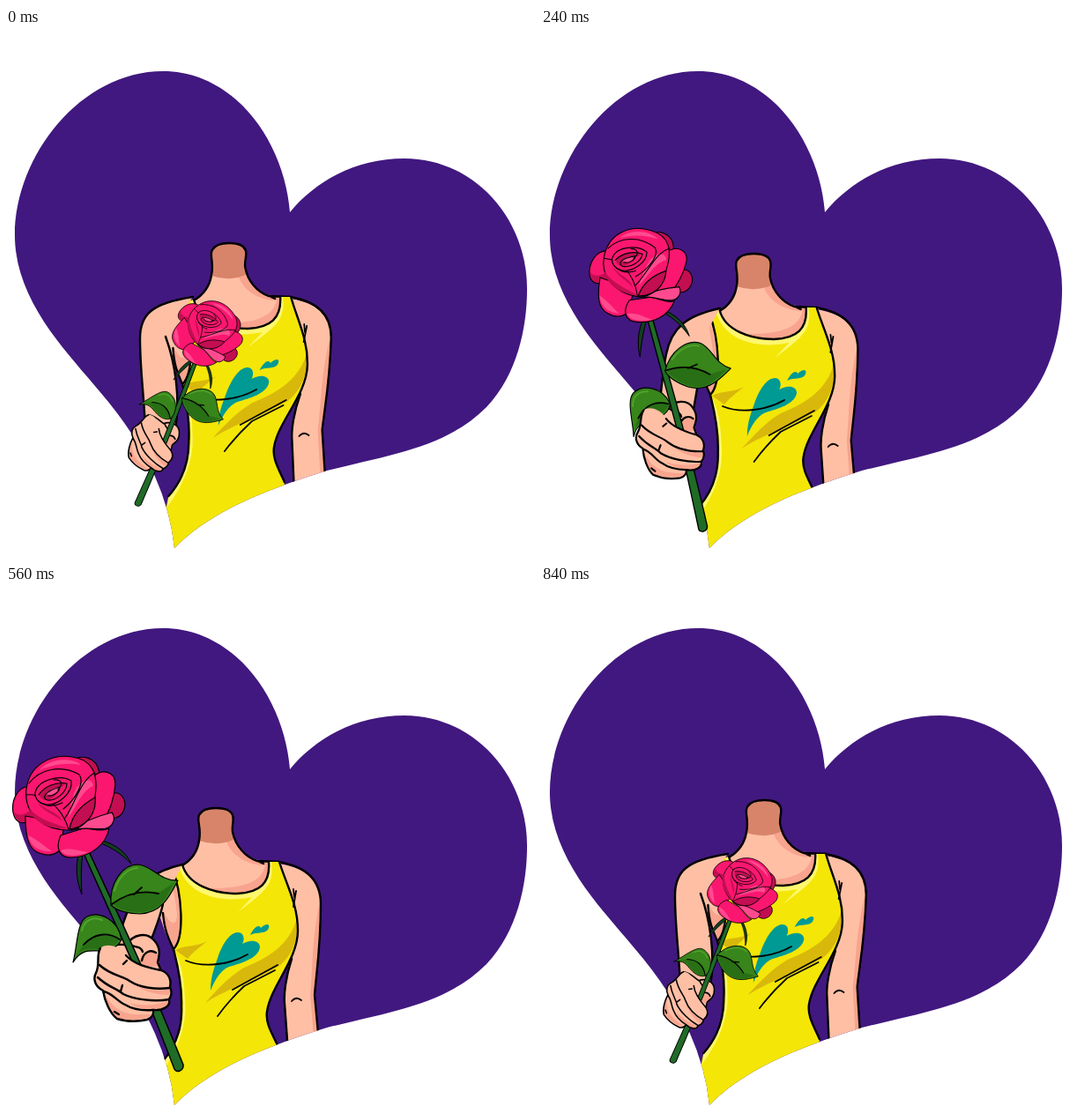
Write an HTML page that moves like this. It is 600 px wide and 600 px high and loops after 1 s.

```html
<!DOCTYPE html>
<html lang="en">
<head>
<meta charset="utf-8">
<title>Rose for you</title>
<style>
html, body { margin: 0; width: 100%; height: 100%; overflow: hidden; background: #fff; }
svg { display: block; width: 100%; height: 100%; }
path { stroke-linecap: round; stroke-linejoin: round; }
.ink { fill: none; stroke: #000; stroke-width: 2.4; }
.thin { fill: none; stroke: #000; stroke-width: 1.8; }
.skin { fill: #ffbfa5; }
.shade { fill: #f8a48e; }
.gold { fill: #d9b80c; }
.glow { fill: #fff76e; }
.teal { fill: #009a94; }
.leaf path:first-child, #head path { stroke: #000; stroke-width: 1.2; }
.leaf { fill: #37851b; }
#head { fill: #fb176f; }
#head .deep { fill: #c30e52; }
#head .pale { fill: #ff4a8f; }
#head .line { fill: none; }
#head .tint { stroke: none; }
</style>
</head>
<body>
<svg viewBox="0 0 600 600">
  <defs>
    <path id="heart" d="M322 209C316 130 260 49 178 49C85 49 10 145 10 235C10 310 70 368 106 412Q182 500 191 590C230 550 290 525 364 502C440 483 500 475 545 430C580 393 591 340 591 296C591 215 530 148 452 148C395 148 350 175 322 209Z"/>
    <clipPath id="clip"><use href="#heart"/></clipPath>
  </defs>
  <use href="#heart" fill="#41187f"/>

  <g clip-path="url(#clip)"><g id="body">
    <!-- right arm -->
    <path class="skin" d="M296 314C335 318 357 330 357 362C357 410 352 440 350 465L356 530L320 530L315 470C318 440 326 410 326 390Z"/>
    <path class="shade" d="M357 355C346 400 348 440 345 465L350 525L356 525L350 465C352 440 357 410 357 355Z"/>
    <path class="ink" d="M308 314C335 318 357 330 357 362C357 410 352 440 350 465L356 530M324 424C317 445 315 465 316 475L320 530"/>
    <path class="thin" d="M324 472Q329 466 335 471"/>
    <!-- neck and chest -->
    <path class="skin" d="M219 290C222 275 216 268 219 261Q223 253 238 253Q254 253 257 261C259 267 256 272 257 280C260 296 272 309 285 313L312 315L310 360L215 420L190 412C180 400 178 380 167 358L176 325L200 318C210 312 217 304 219 290Z"/>
    <path class="shade" d="M258 286C262 304 278 312 298 314C300 338 288 349 262 350C250 350 240 348 232 344C275 344 290 335 294 318C272 318 255 305 250 291ZM186 322C197 350 202 392 191 411C186 400 180 392 179 372C187 386 194 388 194 372Z"/>
    <path fill="#d8846a" d="M219 261Q223 253 238 253Q254 253 257 261C259 267 256 272 257 280L258 289Q240 297 219 290C222 275 216 268 219 261Z"/>
    <path class="ink" d="M190 320L200 318C210 312 217 304 219 290C222 275 216 268 219 261Q223 253 238 253Q254 253 257 261C259 267 256 272 257 280C260 296 272 309 285 313L310 314M285 313L292 316"/>
    <!-- top -->
    <path fill="#f4e607" d="M188 320L200 317C206 340 235 350 262 350C288 349 300 338 298 314L310 314C318 340 331 362 331 392C331 425 300 455 296 484C294 497 302 509 308 521L325 610L165 610L178 540C195 520 200 500 199 478C200 450 193 425 190 413C203 400 200 350 188 320Z"/>
    <path class="glow" d="M200 317C206 340 235 350 262 350C288 349 300 338 298 314L301 314C304 340 296 346 263 371L279 354C240 362 205 350 196 319ZM191 414C197 440 204 470 200 490C196 512 188 528 178 540L177 552C194 528 206 500 203 470C202 440 197 425 191 414Z"/>
    <path class="gold" d="M331 372C326 402 305 420 270 434C256 442 242 456 226 474C250 458 280 450 310 432C325 420 333 400 331 372ZM192 414C203 408 214 411 228 404C220 411 212 416 206 424Z"/>
    <path class="teal" d="M232 460C232 442 238 430 241 420C248 402 256 394 263 394C270 394 271 402 268 407C276 402 288 402 288 411C286 424 266 429 253 433C243 437 237 448 232 460ZM277 397C282 387 287 385 289 389C295 383 301 384 297 391C293 396 285 393 277 397Z"/>
    <path class="ink" d="M188 320C200 350 203 400 190 413C193 425 200 450 199 478C200 500 195 520 178 540M200 317C206 340 235 350 262 350C288 349 300 338 298 314M310 314C318 340 331 362 331 392C331 425 300 455 296 484C294 497 302 509 309 524"/>
    <path class="thin" d="M204 426C225 435 255 430 274 419M308 431L257 459M305 437L270 455Q253 471 240 489M329 347L326 365M326 345L327 354"/>
    <path class="ink" d="M178 372C180 395 186 404 190 413"/>
  </g></g>

  <path id="arm" class="skin"/>
  <path id="armLine" class="ink"/>

  <g id="palm">
    <path class="skin" d="M107 412C116 406 130 408 137 408C144 396 160 393 168 403C176 412 174 420 172 428L178 442L140 460L106 445Z"/>
    <path class="shade" d="M152 424C156 414 166 412 172 418L174 432L152 434Z"/>
    <path class="ink" d="M107 412C116 406 130 408 137 408C144 396 160 393 168 403C176 412 174 420 172 428L178 442M139 407C145 412 152 408 155 416M154 426C156 416 164 413 170 417"/>
  </g>

  <g id="rose">
    <path d="M83 303C78 320 80 336 86 351C85 335 85 318 87 304ZM109 290C124 294 136 303 142 316C130 304 120 298 108 293Z" fill="#123f20" stroke="#000"/>
    <path d="M87 302C112 358 136 410 150 443C162 475 178 515 191 549C193 554 202 551 201 544C186 507 173 475 157 440C140 400 116 350 93 300Z" fill="#1f6c27" stroke="#000" stroke-width="1.5"/>
    <g id="leafR" class="leaf">
      <path d="M119 363C117 338 132 317 150 317C165 318 175 336 195 335C187 350 178 372 152 373C140 373 126 370 119 363Z"/>
      <path fill="#286f15" d="M121 362C140 350 155 346 172 350L190 338C183 353 175 371 152 371C140 371 128 368 121 362Z"/>
      <path fill="none" stroke="#52a52c" stroke-width="2" d="M123 347C127 332 138 321 149 321"/>
      <path class="thin" d="M120 362C138 349 155 346 173 350M145 351L154 343"/>
    </g>
    <g id="leafL" class="leaf">
      <path d="M131 402C127 378 105 370 92 376C80 382 81 410 76 428C85 413 95 415 105 415C120 415 128 409 131 402Z"/>
      <path fill="#286f15" d="M129 402C115 393 100 395 88 408L79 421C87 411 96 413 105 413C118 413 126 408 129 402Z"/>
      <path fill="none" stroke="#52a52c" stroke-width="2" d="M86 392C89 379 100 376 109 380"/>
      <path class="thin" d="M129 402C115 393 100 395 88 408"/>
    </g>
    <g id="head">
      <path class="deep" d="M73 200C86 191 103 195 106 213L85 235Z"/>
      <path class="deep" d="M121 236C132 234 137 246 134 254C131 264 122 266 114 264Z"/>
      <path d="M98 218C110 207 124 212 124 226C123 240 118 258 108 270L85 272Z"/>
      <path d="M26 228C12 230 6 245 8 258C10 268 16 272 26 268L48 262Z"/>
      <path class="deep tint" d="M9 257C12 262 20 262 28 255L38 263L25 267C15 271 11 267 9 257Z"/>
      <path d="M22 262C22 285 25 300 38 304C48 308 56 306 62 300L66 270Z"/>
      <path class="pale tint" d="M25 284C28 298 40 303 52 302C44 297 38 290 25 284Z"/>
      <path d="M62 284C55 300 62 310 75 309C95 308 113 296 117 276C110 280 102 277 88 276Z"/>
      <path class="pale tint" d="M62 301C67 309 82 308 94 303C82 302 74 297 62 301Z"/>
      <path class="pale" d="M74 278C88 268 104 262 120 258C125 264 122 274 113 276C102 278 88 274 74 278Z"/>
      <path d="M23 232C26 205 50 191 75 195C98 198 105 214 101 240C102 264 84 278 71 278C45 278 20 262 23 232Z"/>
      <path class="deep tint" d="M25 253C40 268 58 271 70 276C50 278 32 270 25 253ZM35 246C48 258 58 256 64 268C55 260 43 258 35 246Z"/>
      <path class="deep" d="M72 277C75 260 88 248 101 241C103 260 90 275 72 277Z"/>
      <path class="pale tint" d="M38 210C50 196 74 195 85 204C68 201 52 204 38 210ZM80 230C90 218 98 220 99 228C88 232 82 246 71 264C73 250 75 240 80 230Z"/>
      <path class="line" d="M23 238C40 236 62 248 71 277M26 225C38 209 62 203 83 215C90 224 78 244 65 254M101 213C84 221 78 250 67 264M33 239C40 253 54 252 64 247"/>
      <path d="M33 236C35 222 60 214 74 222C76 235 60 250 46 249C38 248 33 243 33 236Z"/>
      <path class="deep tint" d="M38 237C44 229 55 225 68 225C59 232 56 243 46 244C41 244 38 241 38 237Z"/>
      <path class="pale tint" d="M45 237C50 231 58 229 63 229C58 235 52 241 45 237Z"/>
      <path class="line" d="M37 238C44 228 57 223 69 225C69 235 57 245 47 244C40 242 44 234 61 229C61 234 54 240 48 239M54 221C62 220 66 225 59 232"/>
    </g>
  </g>

  <g id="fingers">
    <path class="skin" d="M107 412C102 420 107 430 102 440C98 448 102 456 110 460C112 472 118 486 126 492C138 496 152 495 160 493C166 491 168 486 167 482C178 483 187 478 185 470C189 464 188 460 186 456C188 447 184 440 176 437C160 434 145 430 136 420C130 410 114 405 107 412Z"/>
    <path class="shade" d="M111 463C119 477 130 486 146 487L165 487C162 493 140 495 127 491C119 485 113 473 111 463ZM140 474C154 478 172 477 185 471C184 479 176 482 167 481C156 482 147 479 140 474ZM146 453C158 460 172 461 187 458L185 465C170 465 156 461 146 453Z"/>
    <path class="ink" d="M107 412C102 420 107 430 102 440C98 448 102 456 110 460C112 472 118 486 126 492C138 496 152 495 160 493C166 491 168 486 167 482C178 483 187 478 185 470C189 464 188 460 186 456C188 447 184 440 176 437C160 434 145 430 136 420"/>
    <path class="ink" d="M106 431C119 443 132 443 140 449C152 457 170 459 186 457M104 445C117 457 125 457 133 464C145 470 168 473 185 470M111 461C122 464 126 472 135 476C145 482 156 483 167 482M133 430L137 426M130 461L132 454M123 484L128 487"/>
  </g>
</svg>
<script>
const $ = id => document.getElementById(id);
const STEP = 40, LOOP = 1000;
const times = [0, 160, 240, 400, 560, 680, 840, 1000];

// body dx dy | rose x y scale turn | hand x y scale turn
const rest = {
  v: [15, -9, 229, 347, .65, 45.4, 167, 471, .65, 38], leaf: [2, 4],
  arm: "M212 305C165 312 152 325 152 352C152 390 157 420 158 455L192 455C198 420 192 380 181 350"
};
const dip = {
  v: [8, 7, 157, 325, .79, 21.2, 154, 494, .82, 22], leaf: [22, -24],
  arm: "M206 322C165 328 148 345 146 375C143 400 144 430 146 470L180 470C186 430 190 410 176 368"
};
const lift = {
  v: [3, 3, 113, 281, .92, 9.1, 147, 467, .9, 5], leaf: [9, -26],
  arm: "M203 318C165 326 148 340 142 370C138 390 136 410 134 440L172 440C174 420 182 400 178 362"
};
const reach = {
  v: [0, 0, 71, 252, 1, 0, 144, 446, 1, 0], leaf: [-11, 18],
  arm: "M200 317C170 324 152 336 141 362C133 382 126 400 124 430L160 430C158 410 172 390 178 362"
};
const settle = { ...reach, leaf: [0, 0] };
const back = {
  v: [5, -3, 141, 271, .875, 16.5, 151, 455, .86, 18], leaf: [2.5, -14],
  arm: "M206 312C168 320 152 332 146 362C141 385 143 400 144 430L176 430C176 410 182 395 184 362"
};

const numbers = s => s.match(/[\d.]+/g).map(Number);
const rows = [rest, dip, lift, reach, settle, back, rest, rest]
  .map(p => [...p.v, ...p.leaf, ...numbers(p.arm)]);

// Smooth curve through the keys that never overshoots them
const slope = (c, i) => (rows[i + 1][c] - rows[i][c]) / (times[i + 1] - times[i]);
function tangent(c, i) {
  if (i === 0 || i === times.length - 1) return 0;
  const a = slope(c, i - 1), b = slope(c, i);
  return a * b > 0 ? 2 * a * b / (a + b) : 0;
}
function sample(t) {
  let i = 0;
  while (t >= times[i + 1]) i++;
  const h = times[i + 1] - times[i], u = (t - times[i]) / h;
  return rows[i].map((p, c) => {
    const q = rows[i + 1][c], m = tangent(c, i) * h, n = tangent(c, i + 1) * h;
    return p + u * m + u * u * (3 * (q - p) - 2 * m - n) + u * u * u * (2 * (p - q) + m + n);
  });
}

const set = (id, value) => $(id).setAttribute("transform", value);
const place = (id, x, y, s, r, cx, cy) =>
  set(id, `translate(${x} ${y}) rotate(${r}) scale(${s}) translate(${-cx} ${-cy})`);

function draw(t) {
  const [dx, dy, rx, ry, rs, rr, hx, hy, hs, hr, lr, ll, ...arm] = sample(t);
  set("body", `matrix(1 0 ${-.002 * dx} 1 ${1.506 * dx} ${dy})`);
  place("rose", rx, ry, rs, rr, 71, 252);
  for (const id of ["palm", "fingers"]) place(id, hx, hy, hs, hr, 144, 446);
  set("leafR", `rotate(${lr} 119 365)`);
  set("leafL", `rotate(${ll} 131 400)`);
  let k = 0;
  const d = rest.arm.replace(/[\d.]+/g, () => arm[k++].toFixed(2));
  $("arm").setAttribute("d", d);
  $("armLine").setAttribute("d", d);
}

const start = performance.now();
function tick() {
  const t = (performance.now() - start) % LOOP;
  draw(Math.floor(t / STEP) * STEP);
  requestAnimationFrame(tick);
}
tick();
</script>
</body>
</html>
```
